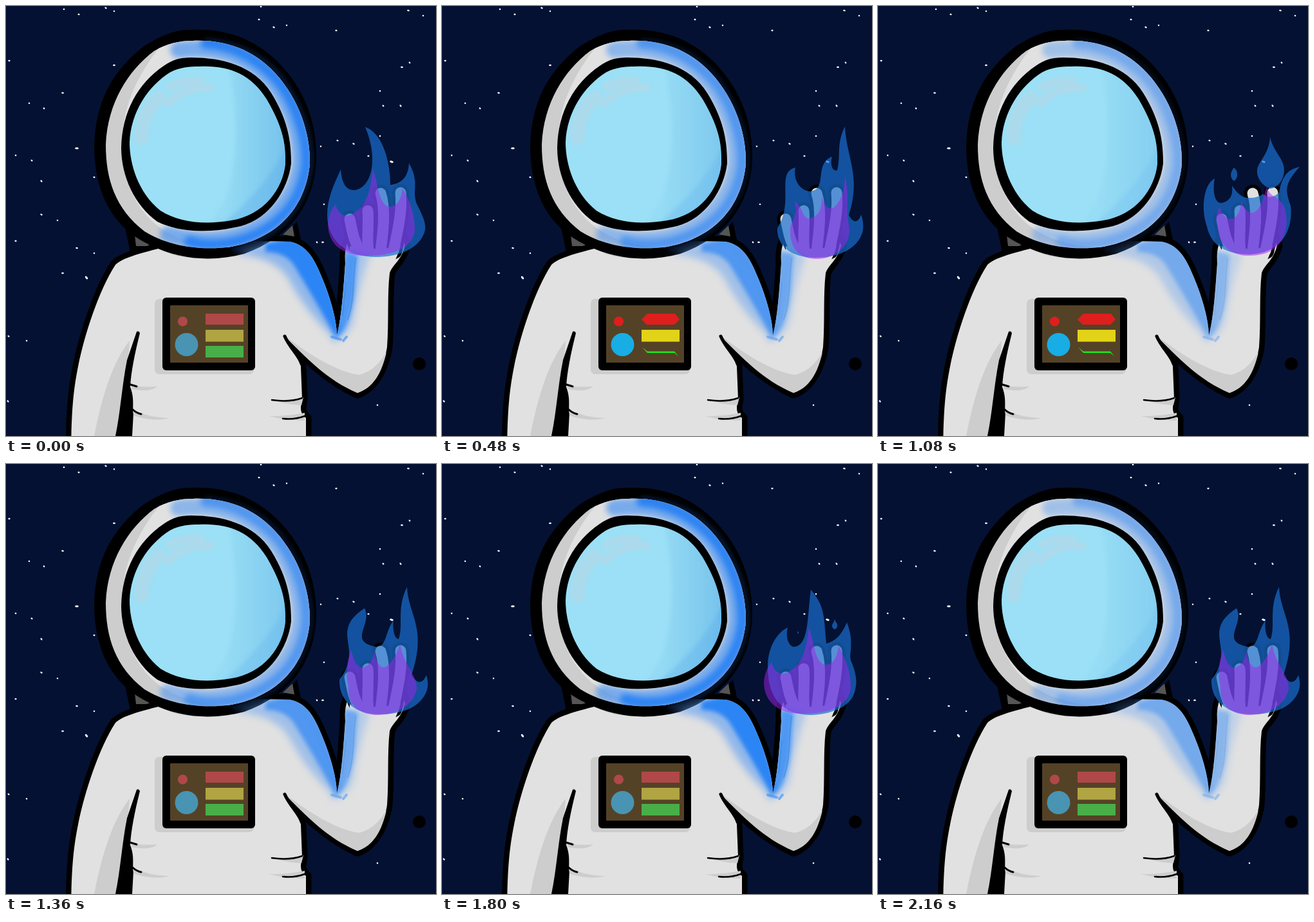
Animation of 668 by 668 pixels, one loop 2200 ms. Source, as an HTML page with a canvas:

```html
<!DOCTYPE html>
<html lang="en">
<head>
<meta charset="utf-8">
<title>Astronaut</title>
<style>
html, body { margin: 0; width: 100%; height: 100%; overflow: hidden; background: #041132; }
canvas { display: block; width: 100vw; height: 100vh; }
</style>
</head>
<body>
<canvas id="stage" width="668" height="668"></canvas>
<script>
const SIZE = 668, LOOP = 2200, STEP = 40, FLAME = 800;
const ctx = document.getElementById('stage').getContext('2d');

function layer() {
  const c = document.createElement('canvas');
  c.width = c.height = SIZE;
  return c.getContext('2d');
}
const nums = s => s.trim().split(/\s+/).map(Number);
const mix = (a, b, k) => a.map((v, i) => v + (b[i] - v) * k);

// Linear blend between keyed number lists
function key(t, times, values) {
  let i = 0;
  while (i < times.length - 2 && t >= times[i + 1]) i++;
  const k = (t - times[i]) / (times[i + 1] - times[i]);
  return mix(values[i], values[i + 1], Math.min(1, Math.max(0, k)));
}
function fill(g, d, color) {
  g.fillStyle = color;
  g.fill(new Path2D(d));
}
function line(g, d, color, width) {
  g.strokeStyle = color;
  g.lineWidth = width;
  g.lineCap = g.lineJoin = 'round';
  g.stroke(new Path2D(d));
}
function dot(g, x, y, r, color) {
  g.fillStyle = color;
  g.beginPath();
  g.arc(x, y, r, 0, 7);
  g.fill();
}
function box(g, x, y, w, h, r, color) {
  g.fillStyle = color;
  g.beginPath();
  g.roundRect(x, y, w, h, r);
  g.fill();
}

const SUIT = '#e1e1e1', SHADE = '#cdcdcd';
const body = 'M240 376C205 385 180 392 170 402C145 440 122 510 112 560C104 600 102 630 101 690L466 690L466 640C455 632 458 622 460 610L458 560C455 540 440 525 432 512C465 545 500 580 546 601C575 590 588 555 592 530C595 490 592 450 596 415C600 402 614 396 620 372L612 350L545 350C528 360 526 380 527 400C524 440 522 480 514 512C514 490 505 455 490 420C478 390 465 370 440 366L380 365Z';
const shell = 'M285 37C340 34 390 50 430 95C470 140 483 190 482 240C478 310 440 360 370 385C320 398 270 394 225 372C165 345 138 290 137 220C138 150 165 100 215 62C240 47 260 37 285 37Z';
const ring = 'M290 54C345 52 390 70 425 112C460 155 473 205 472 245C466 310 425 360 350 374C300 381 250 372 215 350C170 315 155 270 155 215C158 150 190 100 230 70C250 58 270 54 290 54Z';
const rim = 'M287 80C335 80 385 92 412 135C440 180 443 215 443 245C438 285 410 330 365 342C310 355 265 350 235 335C200 310 179 265 179 220C180 165 205 120 245 93C260 83 270 80 287 80Z';
const visor = 'M300 94C345 92 380 105 405 145C428 185 435 210 434 245C430 285 400 325 350 333C310 340 270 337 240 318C205 290 192 245 192 212C194 165 220 125 255 103C270 95 285 94 300 94Z';
const fingers = ['M534 331C538 350 540 365 550 380', 'M562 318C564 340 560 360 563 380',
  'M582 291C590 315 586 350 582 380', 'M613 290C616 320 608 350 602 380'];
const stars = nums(`90 5 113 13 155 3 168 8 5 85 88 135 36 151 59 159 168 92 15 232 40 240 55 272 110 221
  137 266 55 324 80 333 15 365 110 376 137 384 125 422 88 415 32 520 4 513 3 614 396 1 393 21 416 33
  436 30 513 38 625 7 648 15 627 88 615 95 581 132 586 155 613 155 581 202 515 209 540 214 489 218
  563 233 599 242 494 308 483 367 492 367 577 620`);

function drawSky(g) {
  g.fillStyle = '#041132';
  g.fillRect(0, 0, SIZE, SIZE);
  g.fillStyle = '#fff';
  for (let i = 0; i < stars.length; i += 2) {
    const n = i / 2, big = [12, 19, 41].includes(n);
    g.beginPath();
    g.ellipse(stars[i], stars[i + 1], big ? 2.9 : 1.3 + n % 3 * .3, big ? 1.6 : 1.2, n % 4 * .3, 0, 7);
    g.fill();
  }
  dot(g, 642, 556, 10, '#000');
}

function drawSuit(g) {
  fill(g, 'M183 335L193 382L250 382L220 340ZM452 335L460 372L420 372Z', '#000');
  fill(g, 'M199 347L224 373L202 373ZM445 341L430 355L448 358Z', '#555');
  line(g, body, '#000', 17);
  fill(g, body, SUIT);
  fill(g, 'M240 376C255 388 270 390 295 392L320 385L250 370Z', SHADE);

  // left arm
  fill(g, 'M192 520C168 550 150 600 137 668L172 668L190 545Z', SHADE);
  fill(g, 'M203 506Q206 504 208 508C200 540 194 570 193 592C200 610 196 622 198 632L196 668L170 668C178 630 180 590 188 550Z', '#000');

  // right arm
  fill(g, 'M434 513C470 540 510 567 548 573C570 568 582 552 591 538C584 570 570 594 546 601C500 582 465 546 434 513Z', SHADE);
  line(g, 'M433 513C440 530 456 544 459 556', '#000', 5);

  // folds
  fill(g, 'M194 589C205 592 220 592 235 591C225 599 210 598 196 595ZM197 628C215 635 232 640 254 640C235 645 215 642 198 636ZM415 612Q440 615 462 608L459 620Q440 620 415 612ZM408 637Q435 638 464 632L464 644Q435 644 408 637Z', SHADE);
  line(g, 'M193 588L203 591M197 627Q202 632 210 634', '#000', 3);
  line(g, 'M413 612Q440 616 460 609M430 641Q448 643 464 637', '#000', 2.5);

  // hand
  fingers.forEach(f => line(g, f, '#000', 27));
  fingers.forEach(f => line(g, f, SUIT, 17));
  fill(g, 'M534 373Q570 382 613 372Q605 400 594 410L534 405Z', SUIT);

  // chest box
  box(g, 231, 455, 154, 117, 7, SHADE);
  box(g, 243, 453, 144, 113, 6, '#000');
  box(g, 255, 465, 121, 89, 1, '#544226');
}

function drawHelmet(g) {
  fill(g, shell, '#000');
  fill(g, ring, SHADE);
  g.save();
  g.clip(new Path2D(ring));
  fill(g, 'M242 60L300 50L480 50L480 390L310 372C250 362 205 330 186 265L182 200C182 155 205 105 242 60Z', SUIT);
  g.restore();
  fill(g, rim, '#000');
  fill(g, visor, '#9be0f6');
  g.save();
  g.clip(new Path2D(visor));
  g.filter = 'blur(2px)';
  line(g, 'M211 205C211 175 222 155 238 143', 'rgba(180,216,231,.65)', 22);
  line(g, 'M252 151C270 131 292 126 318 127M255 126C270 116 285 117 302 116', 'rgba(182,216,230,.65)', 13);
  g.restore();
}

function drawGlow(g) {
  // helmet rim light
  const edge = new Path2D(ring);
  edge.addPath(new Path2D(rim));
  g.save();
  g.clip(edge, 'evenodd');
  g.filter = 'blur(4px)';
  line(g, 'M268 68C340 60 390 85 423 130C448 170 458 210 457 245C450 300 410 345 350 359C315 366 285 364 252 355', 'rgba(80,150,240,.72)', 26);
  line(g, 'M310 58C355 61 395 84 425 119C452 155 468 205 467 245C460 303 425 351 350 368C325 373 305 372 285 366', 'rgba(38,128,245,.92)', 17);
  g.restore();
  g.save();
  g.filter = 'blur(3px)';
  line(g, 'M310 53C360 55 402 78 430 113C462 158 476 205 475 245C467 310 428 362 352 378', 'rgba(22,85,190,.45)', 4);
  g.restore();

  // tint on the glass
  g.save();
  g.clip(new Path2D(visor));
  const tint = g.createLinearGradient(340, 0, 434, 0);
  tint.addColorStop(0, 'rgba(90,170,225,.1)');
  tint.addColorStop(1, 'rgba(75,160,225,.45)');
  g.filter = 'blur(3px)';
  fill(g, 'M345 90C358 150 362 210 350 270C345 300 330 320 315 340L440 340L440 90Z', tint);
  fill(g, 'M440 205C420 260 380 300 335 340L440 340Z', 'rgba(80,165,235,.3)');
  g.restore();

  // shoulder and forearm
  g.save();
  g.clip(new Path2D(body));
  g.filter = 'blur(6px)';
  fill(g, 'M355 384L405 366L450 360L486 405L518 480L513 518C480 490 455 455 438 422C422 400 400 390 355 384Z', 'rgba(90,155,240,.6)');
  fill(g, 'M530 380L566 384C555 415 546 450 540 490Q530 518 505 522L515 470Z', 'rgba(120,175,242,.55)');
  g.filter = 'blur(3px)';
  fill(g, 'M403 369L440 360L472 372L498 425L520 500L512 514C492 478 470 440 447 402C437 388 422 382 403 382Z', 'rgba(38,130,245,.95)');
  fill(g, 'M525 380L547 386C541 420 545 450 533 485Q526 510 511 516L518 470Z', 'rgba(55,140,245,.8)');
  g.filter = 'none';
  line(g, 'M543 392C538 430 542 455 531 487M528 430L523 480', 'rgba(60,135,220,.6)', 2);
  line(g, 'M506 514L520 518M529 514L524 520', 'rgba(55,140,240,.6)', 4);
  g.restore();
}

// Flame outlines: a start point, then cubic segments
const outer = [
  '575 390 530 390 499 365 499 325 499 300 508 280 520 254 522 276 528 287 543 286 570 280 578 235 558 188 592 200 598 262 597 278 614 276 625 266 626 244 637 264 636 275 635 290 635 296 636 300 637 305 645 322 653 335 651 348 645 375 612 390 575 390',
  '575 390 525 390 506 360 506 315 506 285 520 262 537 254 533 272 540 284 547 284 570 282 567 240 573 195 595 222 593 235 597 279 612 275 621 265 629 246 636 265 636 275 635 290 634 296 634 300 635 305 644 325 645 340 642 350 638 375 610 388 575 390',
  '578 386 545 386 518 375 511 343 500 310 508 275 523 268 519 290 524 306 533 306 546 304 552 295 550 279 558 291 566 299 578 298 586 298 592 296 598 292 608 300 616 296 623 290 627 268 634 254 655 250 632 275 632 285 641 310 645 345 630 383 578 386',
  '580 391 545 391 520 375 521 345 548 305 518 258 549 251 545 270 556 287 572 288 600 285 577 245 606 234 602 248 608 258 614 255 620 232 612 215 626 187 628 235 652 265 632 325 640 340 648 335 651 324 655 335 655 345 653 352 645 378 615 391 580 391',
  '580 389 545 389 517 370 518 335 558 285 500 262 557 224 570 250 530 275 575 284 592 284 588 262 602 243 600 258 604 272 610 272 618 250 606 225 623 191 625 235 655 255 630 328 640 344 648 340 653 328 656 338 656 345 654 351 645 378 615 389 580 389',
  '570 386 535 384 508 355 508 315 508 285 520 268 534 264 532 285 535 297 540 297 544 290 536 240 564 232 548 252 560 275 577 291 590 292 594 278 602 262 603 280 605 296 612 294 622 293 630 291 635 288 636 305 636 315 633 328 628 365 605 387 570 386'
].map(nums);
const inner = [
  '560 388 525 388 501 372 500 340 501 325 506 315 512 308 516 325 528 330 540 322 562 310 566 285 570 253 578 275 578 305 594 312 608 312 614 300 616 283 628 305 636 325 635 350 630 375 605 388 560 388',
  '575 388 545 387 530 370 528 345 524 330 526 318 531 313 536 330 548 335 555 328 562 322 564 312 564 302 570 320 580 325 588 318 598 308 600 292 604 280 610 305 634 290 635 335 632 372 612 388 575 388',
  '580 393 552 392 540 372 541 348 540 335 556 325 547 303 560 310 560 332 572 330 588 325 590 312 590 296 594 312 602 318 610 312 622 300 625 285 626 263 634 300 626 310 632 340 638 370 612 394 580 393',
  '575 390 545 388 530 372 532 345 527 325 530 305 536 289 540 305 546 318 556 316 566 312 571 303 572 291 576 312 584 322 594 312 604 302 608 292 612 280 618 312 640 330 638 350 632 375 608 390 575 390',
  '570 387 540 386 524 360 523 335 521 322 522 312 526 304 530 318 540 325 548 318 558 308 562 292 562 278 574 290 570 312 588 308 600 304 604 300 606 288 612 306 628 290 630 330 628 365 606 387 570 387'
].map(nums);
const flameTimes = [0, 200, 280, 480, 560, 760, 800];
const outerKeys = [...outer, outer[0]];
const innerKeys = [inner[0], ...inner, inner[0]];
const drops = [
  [610, 250, 'M609 203C613 225 632 238 631 256C630 272 620 282 610 284C598 280 588 268 589 255C590 242 608 230 609 203Z'],
  [553, 262, 'M553 251C560 257 560 267 553 272C546 266 547 258 553 251Z']
].map(([x, y, d]) => [x, y, new Path2D(d)]);

function blob(p, color) {
  ctx.fillStyle = color;
  ctx.beginPath();
  ctx.moveTo(p[0], p[1]);
  for (let i = 2; i < p.length; i += 6) ctx.bezierCurveTo(...p.slice(i, i + 6));
  ctx.fill();
}

function drawFlame(t) {
  const c = t % FLAME, blue = 'rgba(27,110,207,.7)';
  blob(key(c, flameTimes, outerKeys), blue);
  const s = 1 - Math.abs(c - 280) / 100;
  if (s > 0) {
    for (const [x, y, d] of drops) {
      ctx.save();
      ctx.translate(x, y);
      ctx.scale(s, s);
      ctx.translate(-x, -y);
      ctx.fill(d);
      ctx.restore();
    }
  }
  blob(key(c, flameTimes, innerKeys), 'rgba(165,35,235,.5)');
}

// Chest lights: dim, narrow, full
const lightTimes = [0, 200, 480, 760, 1080, 1360, LOOP];
const order = [0, 0, 1, 2, 1, 0, 0];
const keyed = list => order.map(i => list[i]);
const redBar = keyed([
  '310 478 339 478 369 478 369 495 340 495 310 495',
  '310 487 319 478 362 478 369 487 361 495 318 495',
  '311 480 330 479 367 478 368 493 345 494 314 495'].map(nums));
const greenBar = keyed([
  '310 528 330 528 369 528 369 546 349 546 310 546',
  '311 530 319 536.5 361 536.5 367 544 361 539 319 539',
  '310 530 325 532 368 531 367 544 350 542 315 541'].map(nums));
const level = keyed([[0], [.78], [1]]);
const lamp = {
  red: [[176, 72, 72], [236, 18, 18]],
  yellow: [[177, 164, 66], [240, 224, 14]],
  green: [[72, 175, 72], [20, 245, 15]],
  blue: [[72, 148, 178], [10, 180, 242]]
};

function poly(p, color) {
  ctx.fillStyle = color;
  ctx.beginPath();
  for (let i = 0; i < p.length; i += 2) ctx.lineTo(p[i], p[i + 1]);
  ctx.fill();
}

function drawLights(t) {
  const [k] = key(t, lightTimes, level);
  const tone = n => `rgb(${mix(...lamp[n], k).map(Math.round)})`;
  dot(ctx, 274.5, 490, 7.6, tone('red'));
  poly(key(t, lightTimes, redBar), tone('red'));
  dot(ctx, 280.5, 526, 18, tone('blue'));
  box(ctx, 310, 503, 59, 18.5, 0, tone('yellow'));
  poly(key(t, lightTimes, greenBar), tone('green'));
}

const base = layer(), glow = layer();
drawSky(base);
drawSuit(base);
drawHelmet(base);
drawGlow(glow);

const glowTimes = [0, 480, 760, 1080, 1360, 1800, 2160];
const glowLevels = [[1], [.8], [1], [.6], [.8], [1], [.6]];

function frame(now) {
  const t = Math.floor(now % LOOP / STEP) * STEP;
  ctx.drawImage(base.canvas, 0, 0);
  ctx.globalAlpha = key(t, glowTimes, glowLevels)[0];
  ctx.drawImage(glow.canvas, 0, 0);
  ctx.globalAlpha = 1;
  drawLights(t);
  drawFlame(t);
  requestAnimationFrame(() => frame(performance.now() - start));
}
const start = performance.now();
frame(0);
</script>
</body>
</html>
```
